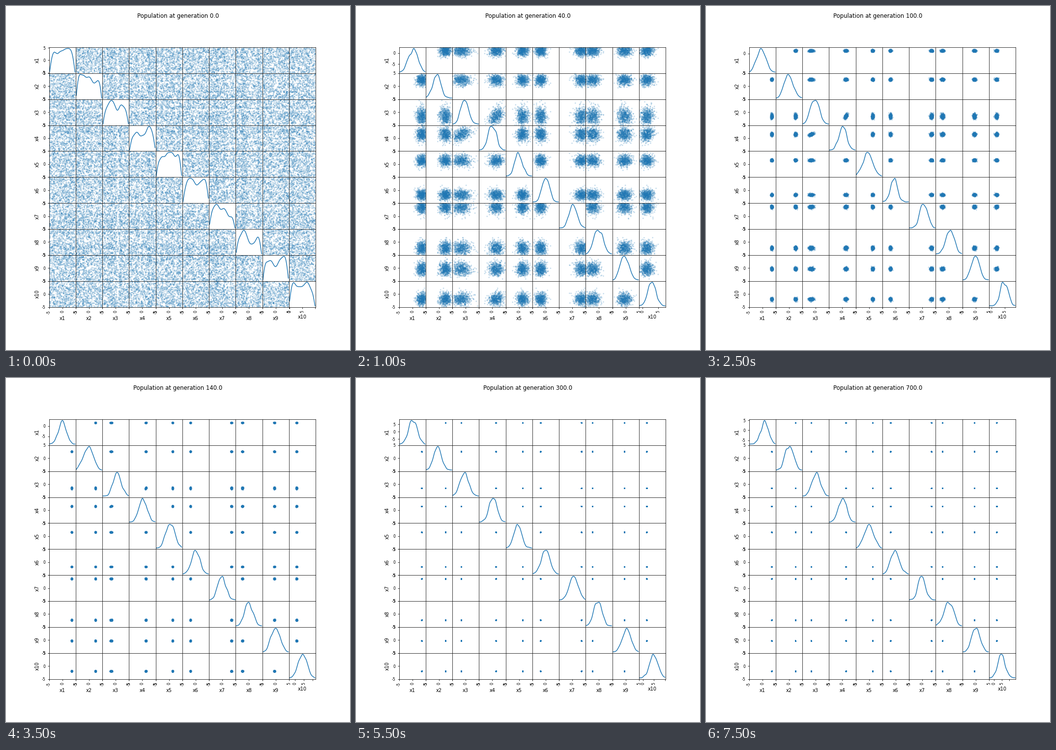
Recreate the animation shown at these times as a matplotlib script. Size 700 by 700 pixels, loop 8 s.

```python
import numpy as np
import matplotlib.pyplot as plt
from matplotlib.animation import FuncAnimation
from matplotlib.ticker import FixedFormatter, FixedLocator, MaxNLocator

N, SIZE = 10, 600
BLUE = "#1f77b4"
GENS = list(range(0, 201, 20)) + list(range(300, 701, 100))
TICKS, NAMES = [-5, 0, 5], ["-5", "0", "5"]

# Where each variable converges, and its spread at generation 60
OPTIMUM = np.array([3.6, 2.5, -1.6, 1.43, 1.45, -1.85, 3.53, -2.36, -.38, -2.04])
SPREAD = np.array([.55, .65, 1.2, .8, .62, .55, .75, .85, .78, .72])


def population(gen):
    rng = np.random.default_rng(gen + 7)
    if gen == 0:
        return rng.uniform(-5, 5, (N, SIZE))
    z = rng.standard_normal((N, SIZE))
    z[3] = .45 * z[2] + .89 * z[3]
    mean = OPTIMUM * (1 - np.exp(-(gen / 18) ** 2))
    std = SPREAD ** min(gen / 60, 1) * np.exp((60 - gen) / 45)
    return mean[:, None] + std[:, None] * z


def kde(data):
    """Gaussian kernel density with Scott's bandwidth, scaled to 0..1."""
    x = np.linspace(data.min(), data.max(), 200)
    width = data.std() * data.size ** -.2
    y = np.exp(-.5 * ((x[:, None] - data) / width) ** 2).sum(axis=1)
    return x, (y - y.min()) / (y.max() - y.min())


def padded(data):
    pad = .025 * np.ptp(data)
    return data.min() - pad, data.max() + pad


fig, axes = plt.subplots(N, N, figsize=(10, 10), dpi=70)
fig.subplots_adjust(left=.125, right=.9, bottom=.125, top=.88, wspace=0, hspace=0)
title = fig.suptitle("", fontsize=12)
dots, lines = {}, []

for (r, c), ax in np.ndenumerate(axes):
    if r == c:
        lines += ax.plot([], [], color=BLUE, lw=1.5)
        ax.set_ylim(-.05, 1.05)
    else:
        dots[r, c] = ax.scatter([], [], s=9, marker=(8, 0, 22.5), color=BLUE,
                                alpha=.25, edgecolors="none")
        ax.set(xlim=(-5, 5), ylim=(-5, 5), xticks=TICKS, yticks=TICKS)
    ax.tick_params(axis="x", labelsize=8, labelrotation=90)
    ax.tick_params(axis="y", labelsize=8)
    ax.xaxis.set_major_formatter(FixedFormatter(NAMES))
    ax.yaxis.set_major_formatter(FixedFormatter(NAMES))
    ax.set(xlabel=f"x{c + 1}", ylabel=f"x{r + 1}")
    ax.xaxis.set_visible(r == N - 1)
    ax.yaxis.set_visible(c == 0)


def update(n):
    gen = GENS[n]
    title.set_text(f"Population at generation {gen:.1f}")
    pop = population(gen)
    for (r, c), d in dots.items():
        d.set_offsets(np.column_stack([pop[c], pop[r]]))
    for i, line in enumerate(lines):
        line.set_data(*kde(pop[i]))
        axes[i, i].set_xlim(padded(pop[i]))

    # The first panel's y ticks follow the range of x1, not the density
    lo, hi = padded(pop[0])
    locs = MaxNLocator(2, steps=[1, 2, 2.5, 5, 10]).tick_values(lo, hi)
    locs = locs[(lo <= locs) & (locs <= hi)]
    axes[0, 0].yaxis.set_major_locator(FixedLocator(-.05 + 1.1 * (locs - lo) / (hi - lo)))
    return []


anim = FuncAnimation(fig, update, frames=len(GENS), interval=500,
                     init_func=lambda: [], repeat=True, repeat_delay=0)
plt.show()
```
